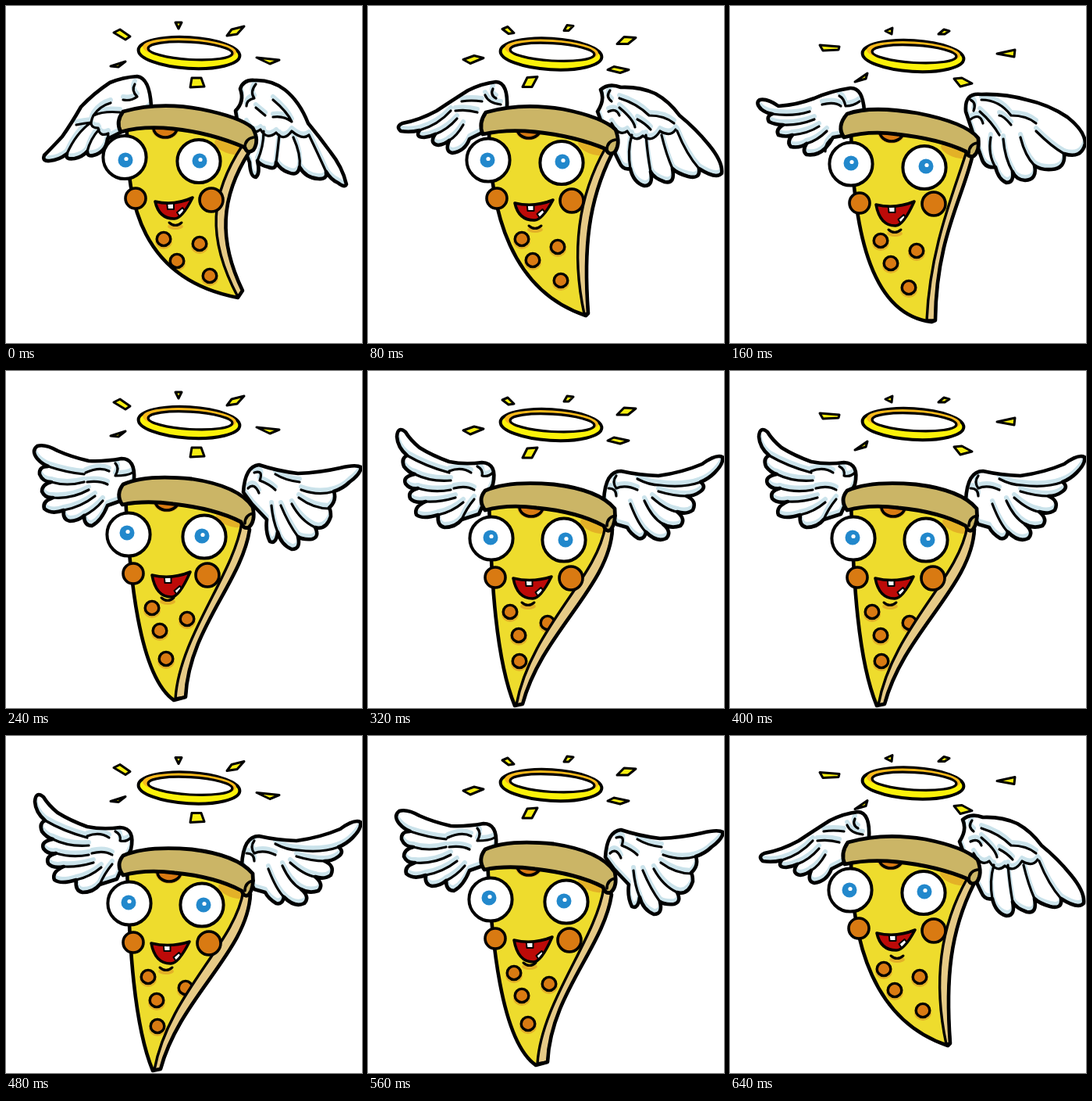
These frames come from a looping animation (456 by 431 pixels, 0.72 s). An HTML page with a canvas:

```html
<!DOCTYPE html>
<html lang="en">
<head>
<meta charset="utf-8">
<title>Flying pizza</title>
<style>
html, body { margin: 0; width: 100%; height: 100%; overflow: hidden; background: #fff; }
canvas { display: block; }
</style>
</head>
<body>
<canvas id="stage" width="456" height="431"></canvas>
<script>
const ctx = document.getElementById('stage').getContext('2d');
const STEP = 80;
const ORDER = [0, 1, 2, 3, 4, 4, 4, 3, 1];            // wing pose at each step
const BOB = [0, 1.5, 4, 6, 9, 8, 6.5, 3, 0.5];        // halo drop at each step

// Poses run from wings down to wings up.
const POSES = [
  {
    left: 'M186 128Q184 92 168 90Q150 91 133 98Q112 112 96 129Q84 150 72 167Q58 182 49 191Q46 199 56 198Q68 197 78 189Q75 197 88 195Q98 193 104 186Q104 193 112 191Q128 187 130 170L150 160Z',
    leftLines: 'M109 149Q90 162 78 189M119 158Q108 170 104 186M131 165L128 178M90 152Q100 150 109 149M134 124Q120 128 112 140Q125 134 146 136M112 140Q104 156 118 156Q120 168 131 163M165 100Q160 108 168 116Q160 122 150 120',
    right: 'M294 134Q306 122 300 106Q304 94 318 95Q340 94 357 107Q376 122 387 150Q402 168 415 186Q431 206 436 228Q434 233 425 226Q416 222 410 212Q412 222 400 221Q384 220 376 206Q374 218 362 213Q352 210 346 200Q346 210 336 206Q326 204 322 198Q326 214 320 219Q313 219 312 200L300 170Z',
    rightLines: 'M388 165Q400 190 410 212M368 168Q378 190 376 206M350 165Q348 185 346 200M330 160Q330 180 322 198M308 150Q316 166 326 158Q334 172 346 162Q356 174 366 160Q380 172 388 165M342 120Q360 135 366 148Q356 140 342 142M320 100Q312 110 318 118Q308 120 308 128M320 130L332 140',
    crust: 'M150 135Q196 122 250 132Q300 142 316 156Q325 172 317 184Q309 190 306 181Q262 162 214 157Q176 153 147 161Q140 148 150 135Z',
    slice: 'M155 150C152 255 176 350 297 373L303 364C272 300 274 245 312 186L290 160Z',
    rind: 'M303 178C262 240 256 295 297 372L303 364C272 300 274 245 312 186Z',
    curl: 0, top: [204, 156], eyes: [152, 193.5, 247, 198.5], pupils: [153, 197, 248, 198],
    cheeks: [166, 246, 263, 248], mouth: [191, 250, 239, 245, 293], chin: [217, 278],
    dots: [202, 298, 248, 304, 219, 326, 261, 345]
  },
  {
    left: 'M178 132Q180 98 164 97Q146 99 128 108Q106 122 88 134Q66 146 44 150Q35 154 42 160Q54 162 66 159Q60 168 72 168Q80 167 86 164Q78 176 90 178Q98 177 104 172Q98 186 108 188Q124 186 130 170L150 160Z',
    leftLines: 'M106 134Q90 152 66 159M114 144Q102 158 86 164M122 152Q114 166 104 172M120 122Q132 120 146 122M112 134Q126 132 140 136M160 106Q156 114 164 118M150 114Q154 124 170 126',
    right: 'M294 135Q304 120 298 107Q308 98 324 104Q348 103 368 112Q386 122 399 140Q420 157 437 178Q455 200 453 214Q446 222 424 208Q426 222 410 218Q396 214 390 208Q394 228 380 225Q366 220 362 212Q366 230 354 230Q340 226 336 208Q326 210 322 200L305 165Z',
    rightLines: 'M396 160Q408 190 424 208M376 165Q382 190 390 208M356 165Q358 190 362 212M338 165Q332 185 336 208M312 150Q322 168 332 160Q342 176 352 166Q364 176 374 160Q388 168 394 158M322 118Q345 125 360 140Q380 140 392 150M345 145Q355 150 362 158M322 130Q340 145 342 155M310 108Q304 116 312 122M308 135Q318 130 322 140',
    crust: 'M151 136Q196 123 250 132Q300 142 317 158Q324 176 316 187Q308 192 305 183Q264 166 214 161Q178 157 147 164Q141 150 151 136Z',
    slice: 'M155 150C154 268 186 365 279 396L282 393C276 310 282 250 312 190L290 160Z',
    rind: 'M304 182C271 240 259 310 277 394L282 393C276 310 282 250 312 190Z',
    curl: 3, top: [206, 157], eyes: [154, 197, 248, 200.5], pupils: [153, 197, 249, 199],
    cheeks: [165, 246, 261, 249], mouth: [188, 252, 237, 248, 295], chin: [214, 282],
    dots: [197, 298, 243, 308, 211, 325, 247, 351]
  },
  {
    left: 'M172 134Q170 104 154 105Q128 109 108 118Q84 127 62 128Q48 118 38 120Q32 124 40 132Q46 137 54 138Q46 141 50 148Q58 152 68 152Q58 158 62 165Q72 168 80 165Q72 174 78 180Q90 182 98 176Q92 186 98 190Q112 192 122 182Q128 176 132 168L150 165Z',
    leftLines: 'M102 135Q80 142 54 138M108 145Q88 153 68 152M114 154Q100 163 80 165M124 160Q112 172 98 176M132 168Q122 174 122 186M118 126Q134 122 142 128M140 115Q146 118 148 128Q158 128 166 122',
    right: 'M302 135Q300 110 322 113Q352 112 380 120Q408 126 432 142Q455 160 455 176Q450 196 428 189Q430 208 412 209Q398 210 390 204Q394 222 378 223Q366 222 362 212Q364 226 354 226Q344 222 340 206Q326 208 322 194L312 165Z',
    rightLines: 'M392 160Q412 180 428 189M372 168Q378 192 390 204M350 170Q352 195 362 212M334 168Q330 190 340 206M322 120Q345 120 360 140Q380 140 392 150M345 140Q350 140 360 152M320 135Q335 148 345 165M308 120Q316 124 312 134M308 145Q320 136 324 150',
    crust: 'M150 138Q180 127 240 137Q302 149 318 169Q320 186 312 192Q305 194 302 186Q268 170 214 164Q178 159 146 168Q136 154 150 138Z',
    slice: 'M155 155C157 300 185 395 258 404L263 402C264 300 296 250 310 194L290 162Z',
    rind: 'M303 186C286 240 256 310 252 402L263 402C264 300 296 250 310 194Z',
    curl: 7, top: [207, 161], eyes: [155, 202, 249, 206.5], pupils: [155, 201, 251, 205],
    cheeks: [166, 252, 261, 253], mouth: [187, 254, 236, 250, 302], chin: [211, 287],
    dots: [193, 300, 239, 313, 206, 329, 229, 360]
  },
  {
    left: 'M164 140Q166 112 148 112Q126 116 106 115Q84 110 66 102Q50 93 40 96Q32 102 40 112Q46 119 54 122Q42 122 43 132Q47 142 58 142Q46 145 46 154Q50 163 60 162Q46 167 49 176Q58 184 74 178Q72 190 82 192Q92 192 100 185Q100 198 110 198Q122 192 130 172L150 165Z',
    leftLines: 'M100 132Q78 130 54 122M100 142Q78 148 58 142M106 152Q84 164 60 162M114 160Q96 174 74 178M124 166Q114 178 100 185M102 130Q120 122 132 128M140 118Q146 124 140 134Q156 134 162 130M104 142Q120 140 130 145',
    right: 'M304 155Q306 122 324 120Q348 128 374 131Q402 130 428 124Q448 119 455 123Q454 132 440 142Q432 150 420 154Q424 166 414 175Q416 178 416 186Q410 204 396 200Q402 212 392 215Q380 216 374 212Q378 228 366 228Q352 222 348 206Q346 222 338 218Q332 206 334 190L315 170Z',
    rightLines: 'M378 152Q400 160 420 154M375 162Q394 176 414 176M366 170Q378 192 396 200M352 172Q362 196 374 212M340 172Q342 192 348 206M318 130Q330 126 325 140Q338 145 345 152M345 132Q358 140 376 142M310 150Q318 142 324 156',
    crust: 'M150 145Q178 132 238 138Q298 147 316 174Q320 192 311 200Q304 203 301 193Q268 176 214 170Q178 165 149 171Q140 158 150 145Z',
    slice: 'M153 160C158 260 170 390 215 421L230 417C234 330 302 270 312 203L290 166Z',
    rind: 'M302 194C292 260 222 340 217 419L230 417C234 330 302 270 312 203Z',
    curl: 14, top: [206, 166], eyes: [157, 209, 254, 212], pupils: [155, 207, 251, 211],
    cheeks: [163, 259, 258, 261], mouth: [187, 261, 236, 257, 310], chin: [207, 291],
    dots: [187, 303, 232, 317, 197, 332, 205, 368]
  },
  {
    left: 'M160 145Q166 118 146 117Q124 120 104 116Q82 108 66 98Q54 88 48 78Q38 70 37 84Q38 98 50 108Q42 112 46 122Q52 130 60 132Q44 135 48 144Q54 152 64 150Q50 154 54 163Q60 170 74 167Q58 174 62 184Q70 190 90 184Q88 198 98 200Q112 200 120 190L142 183L150 165Z',
    leftLines: 'M104 130Q74 122 50 108M106 140Q80 142 60 132M106 152Q84 156 64 150M112 162Q92 168 74 167M122 168Q108 180 90 184M136 164Q126 176 120 190M104 128Q120 122 132 130M140 122Q148 126 146 134Q154 136 160 130M110 150Q126 146 136 152',
    right: 'M302 165Q304 128 324 128Q346 133 372 134Q402 130 428 119Q446 106 454 110Q456 118 444 130Q436 138 426 142Q434 148 426 154Q418 160 408 160Q422 166 416 178Q408 184 396 180Q408 190 400 198Q388 202 378 196Q390 206 382 214Q370 220 356 206Q354 216 346 214Q336 208 332 200L318 196Z',
    rightLines: 'M374 146Q404 150 426 142M372 154Q392 160 408 160M364 162Q382 178 396 180M354 166Q364 188 378 196M336 170Q346 196 356 206M318 134Q312 142 318 150Q330 145 345 152M308 150Q318 150 318 160M345 138Q360 146 374 146',
    crust: 'M150 153Q180 140 238 145Q296 152 316 176Q318 194 311 203Q305 207 302 198Q268 180 216 175Q180 170 150 178Q140 165 150 153Z',
    slice: 'M155 168C158 270 164 370 188 428L198 426C222 335 310 275 313 202L290 170Z',
    rind: 'M304 198C294 265 208 330 190 427L198 426C222 335 310 275 313 202Z',
    curl: 17, top: [209, 174], eyes: [158, 214, 251, 216], pupils: [157, 213, 253, 216],
    cheeks: [163, 264, 260, 265], mouth: [186, 265, 235, 263, 312], chin: [205, 297],
    dots: [182, 308, 230, 322, 193, 338, 194, 371]
  }
];

const SPARKS = [
  ['138 34 146 30 159 39 153 43', '217 21 225 21 221 29', '283 38 289 30 305 26 296 36', '321 66 350 69 338 74', '238 92 250 92 254 103 236 104', '134 77 153 71 144 78'],
  ['122 67 136 62 148 65 131 72', '172 28 179 25 187 33 180 34', '251 30 255 23 263 24 257 30', '319 47 328 38 343 39 333 47', '307 80 315 76 334 80 323 84', '198 102 204 90 217 89 210 102'],
  ['115 46 140 48 139 52 119 53', '199 28 208 24 207 32', '267 32 274 26 281 28 275 32', '342 57 365 52 364 61', '287 89 297 88 310 95 295 99', '160 93 176 82 174 89']
];

function shape(path, fill, width) {
  const p = typeof path === 'string' ? new Path2D(path) : path;
  if (fill) { ctx.fillStyle = fill; ctx.fill(p); }
  if (width) { ctx.strokeStyle = '#000'; ctx.lineWidth = width; ctx.stroke(p); }
}

function oval(x, y, rx, ry, fill, width, turn = 0) {
  const p = new Path2D();
  p.ellipse(x, y, rx, ry, turn, 0, 7);
  shape(p, fill, width);
}

function pairs(list, draw) {
  for (let i = 0; i < list.length; i += 2) draw(list[i], list[i + 1], i / 2);
}

function wing(outline, lines) {
  const edge = new Path2D(outline), rows = new Path2D(lines);
  shape(edge, '#fff');
  ctx.save();
  ctx.clip(edge);
  ctx.translate(0, -4);
  ctx.strokeStyle = '#cbe3eb';
  ctx.lineWidth = 6;
  ctx.stroke(edge);
  ctx.stroke(rows);
  ctx.restore();
  shape(rows, null, 3.2);
  shape(edge, null, 4.6);
}

function face(p) {
  pairs(p.cheeks, (x, y, i) => oval(x, y, 13 + 2 * i, 13 + 2 * i, '#d97a12', 3.6));
  pairs(p.eyes, (x, y) => oval(x, y, 27.6, 27.6, '#fff', 4));
  pairs(p.pupils, (x, y) => {
    oval(x, y, 9.5, 9.5, '#2288cc');
    oval(x + 1, y - 1.5, 2.6, 2.6, '#fff');
  });

  const [x0, y0, x1, y1, low] = p.mouth, mid = (x0 + x1) / 2;
  const mouth = new Path2D(`M${x0} ${y0}Q${mid} ${y0 + 6} ${x1} ${y1}Q${mid + 10} ${low - 20} ${mid} ${low - 21}Q${x0 + 5} ${low - 21} ${x0} ${y0}Z`);
  shape(mouth, '#bd0a08');
  ctx.save();
  ctx.clip(mouth);
  shape(`M${mid - 9} ${y0}h9v10h-8z`, '#fff', 2);
  shape(`M${mid + 4} ${low - 29}l7 -6l5 6l-6 9z`, '#fff', 2);
  ctx.restore();
  shape(mouth, null, 3.6);

  const [cx, cy] = p.chin;
  oval(cx, cy + 4, 10, 4, '#e3b127');
  shape(`M${cx - 8} ${cy - 1}Q${cx} ${cy + 6} ${cx + 8} ${cy - 1}`, null, 3);
}

function pizza(p) {
  const slice = new Path2D(p.slice);
  shape(slice, '#eedc2d');
  ctx.save();
  ctx.clip(slice);
  const [tx, ty] = p.top;
  oval(tx + 80, ty + 24, 18, 8, '#e3b127', 0, 0.4);
  oval(tx, ty, 18, 15, '#e3b127');
  oval(tx, ty, 15, 12, '#d97a12', 3.6);
  pairs(p.dots, (x, y) => {
    oval(x, y + 3, 11, 10, '#e3b127');
    oval(x, y, 8.8, 8.6, '#d97a12', 3.4);
  });
  ctx.restore();
  shape(p.rind, '#e6ca86', 3.4);
  shape(slice, null, 4.6);
  shape(p.crust, '#cbb566', 4.8);
  const c = p.curl;
  shape(`M306 ${181 + c}Q306 ${170 + c} 317 ${168 + c}`, null, 3.6);
  face(p);
}

function halo(drop, sparks) {
  ctx.save();
  ctx.translate(0, drop);
  oval(234.5, 60, 65, 19.8, '#fbf20a', 4, 0.06);
  oval(235, 55.5, 60, 14, '#fab91b', 0, 0.06);
  oval(236, 57.3, 54, 11.2, '#fff', 3.2, 0.06);
  for (const s of sparks) shape(`M${s}Z`, '#f6ee12', 3);
  ctx.restore();
}

function frame(now) {
  const step = Math.floor(now / STEP) % ORDER.length;
  const p = POSES[ORDER[step]];
  ctx.fillStyle = '#fff';
  ctx.fillRect(0, 0, 456, 431);
  ctx.lineJoin = ctx.lineCap = 'round';
  wing(p.left, p.leftLines);
  wing(p.right, p.rightLines);
  pizza(p);
  halo(BOB[step], SPARKS[step % 3]);
}

const start = performance.now();
function tick() {
  frame(performance.now() - start);
  requestAnimationFrame(tick);
}
tick();
</script>
</body>
</html>
```
